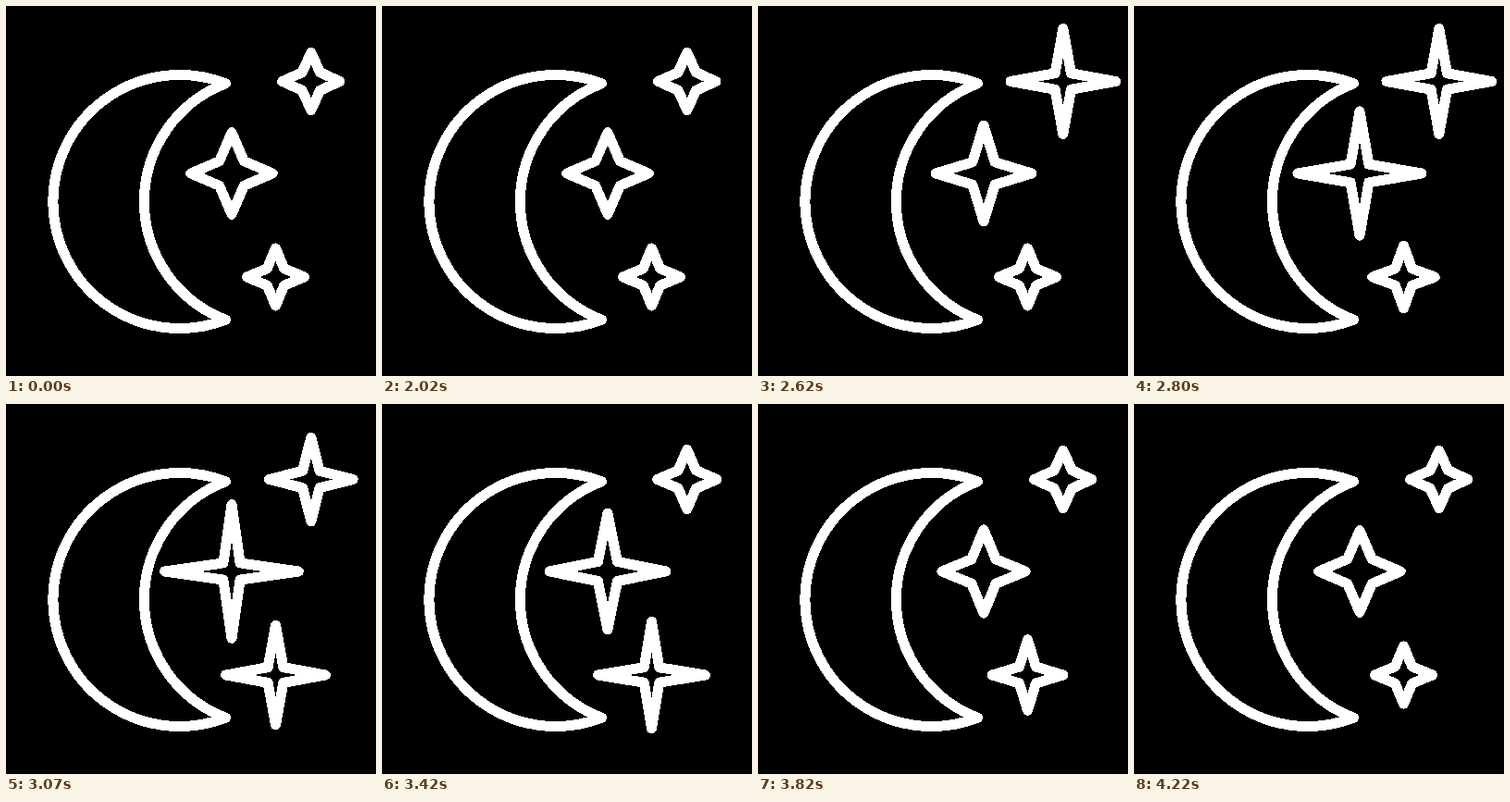
Animation, 400 px wide and 400 px high, one loop 4.52 s. Source, as an HTML page:

```html
<!DOCTYPE html>
<html lang="en">
<head>
<meta charset="utf-8">
<title>Moon and twinkling stars</title>
<style>
  html, body { margin: 0; height: 100%; overflow: hidden; background: #000; }
  svg { display: block; width: 100%; height: 100%; }
  path { fill: none; stroke: #fff; stroke-width: 11; stroke-linejoin: round; shape-rendering: crispEdges; }
</style>
</head>
<body>
<svg viewBox="0 0 400 400">
  <path d="M237.5 83.8A137 137 0 1 0 237.5 339.2A136.6 136.6 0 0 1 237.5 83.8Z"/>
  <path class="star"/>
  <path class="star"/>
  <path class="star"/>
</svg>
<script>
const LOOP = 4520, GROW = 720, SHRINK = 900;

// tip and notch: [resting, fully grown] distances from the centre
const stars = [
  { x: 329.8, y: 81.5, start: 2000, tip: [31.2, 57.2], notch: [9.7, 8.7] },
  { x: 244, y: 181, start: 2390, tip: [44.3, 72.3], notch: [13.3, 9.1] },
  { x: 291.5, y: 293, start: 2640, tip: [31, 58], notch: [9.2, 8.2] }
];
const paths = document.querySelectorAll('.star');

const bezier = (a, b, s) => 3 * (1 - s) * s * ((1 - s) * a + s * b) + s ** 3;
const mix = ([from, to], p) => from + (to - from) * p;

// cubic-bezier(.5, 0, .25, 1), solved by bisection
function ease(x) {
  if (x <= 0) return 0;
  if (x >= 1) return 1;
  let low = 0, high = 1;
  for (let i = 0; i < 20; i++) {
    const mid = (low + high) / 2;
    if (bezier(.5, .25, mid) < x) low = mid; else high = mid;
  }
  return bezier(0, 1, low);
}

function starPath({ x, y, tip, notch }, p) {
  const t = mix(tip, p), n = mix(notch, p);
  const points = [[0, -t], [n, -n], [t, 0], [n, n], [0, t], [-n, n], [-t, 0], [-n, -n]];
  return 'M' + points.map(([dx, dy]) => `${x + dx} ${y + dy}`).join('L') + 'Z';
}

function draw() {
  const time = performance.now() % LOOP;
  stars.forEach((star, i) => {
    const age = time - star.start;
    const p = ease(age / GROW) - ease((age - GROW) / SHRINK);
    paths[i].setAttribute('d', starPath(star, p));
  });
  requestAnimationFrame(draw);
}
draw();
</script>
</body>
</html>
```
